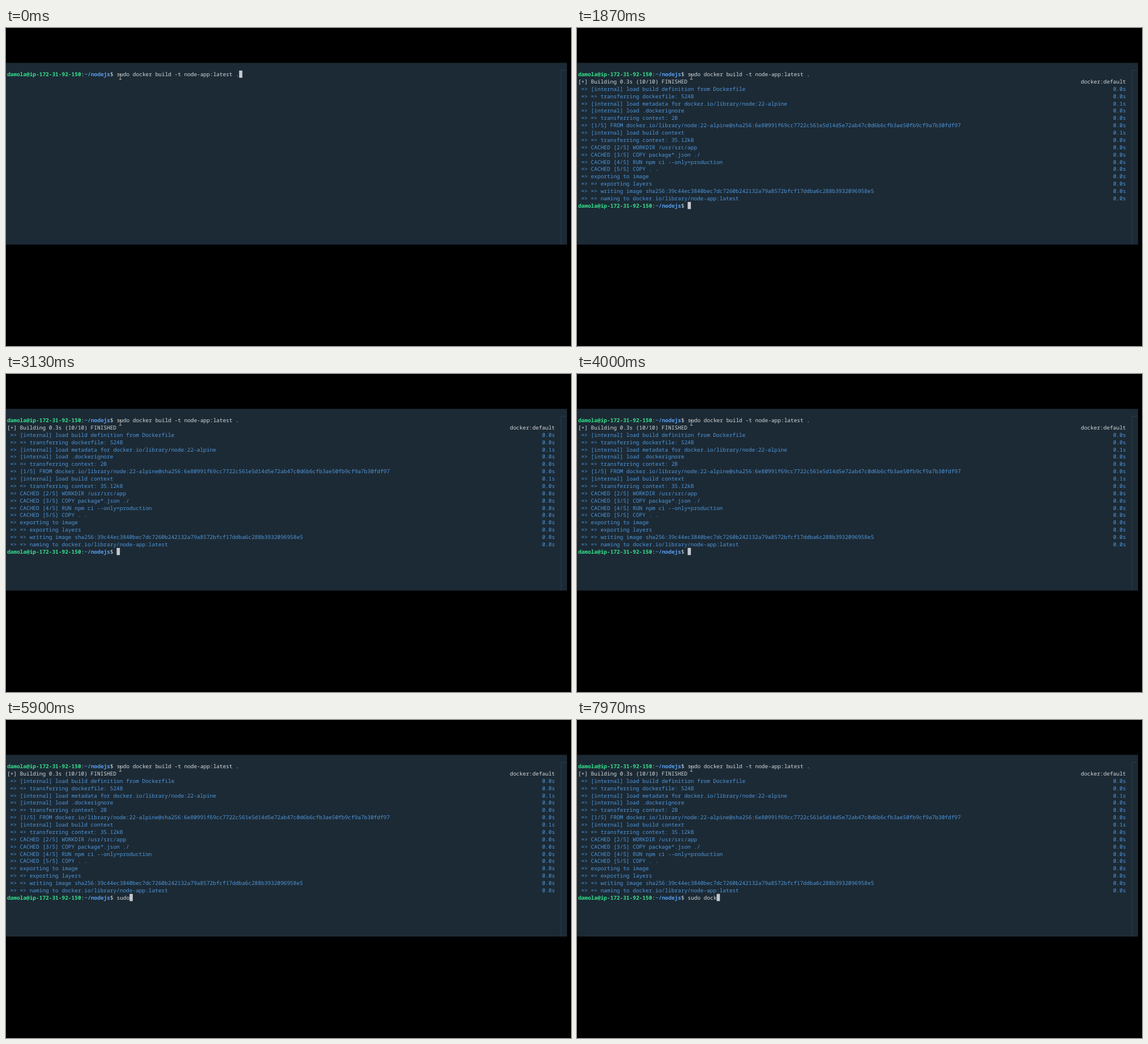
An HTML page that plays this animation: 998 px wide and 561 px high, repeating every 8 s.

```html
<!DOCTYPE html>
<html lang="en">
<head>
<meta charset="utf-8">
<title>Terminal build</title>
<style>
  html, body { margin: 0; width: 100%; height: 100%; overflow: hidden; background: #000; }
  svg { display: block; width: 100%; height: 100%; }
  text {
    font-family: "Noto Sans Mono", "DejaVu Sans Mono", monospace;
    font-size: 9.488px;
    white-space: pre;
    text-rendering: geometricPrecision;
  }
  .user { fill: #35e08c; font-weight: 700; }
  .path { fill: #5a9ff0; font-weight: 700; }
  .plain { fill: #d3d8dc; }
  .step { fill: #5096d9; }
</style>
</head>
<body>
<svg viewBox="0 0 998 561" preserveAspectRatio="xMinYMin meet">
  <rect width="998" height="561" fill="#000"/>
  <rect y="61.5" width="991" height="320.5" fill="#1c2a35"/>
  <path d="M991 74.5H980.5V382" fill="none" stroke="#2b3a47"/>
  <g id="screen"></g>
  <rect id="cursor" width="5.7" height="12.7" fill="#c4cacf"/>
  <path d="M199.8 81.5H204.2M202 81.5V90.5M199.8 90.5H204.2" fill="none" stroke="#c9b9a6" stroke-width="0.9"/>
</svg>
<script>
const LOOP = 8000;
const LEFT = 1.9, CELL = 5.693, TOP = 75.1, ROW = 12.87, BASE = 10;
const LAST_ROW = 18, PROMPT_LEN = 34, COLUMNS = 170;
const ENTER = 570, OUTPUT = 870, READY = 1130;

const command = "sudo docker build -t node-app:latest .";
const steps = [
  "[internal] load build definition from Dockerfile",
  "=> transferring dockerfile: 524B",
  "[internal] load metadata for docker.io/library/node:22-alpine",
  "[internal] load .dockerignore",
  "=> transferring context: 2B",
  "[1/5] FROM docker.io/library/node:22-alpine@sha256:6e80991f69cc7722c561e5d14d5e72ab47c0d6b6cfb3ae50fb9cf9a7b30fdf97",
  "[internal] load build context",
  "=> transferring context: 35.12kB",
  "CACHED [2/5] WORKDIR /usr/src/app",
  "CACHED [3/5] COPY package*.json ./",
  "CACHED [4/5] RUN npm ci --only=production",
  "CACHED [5/5] COPY . .",
  "exporting to image",
  "=> exporting layers",
  "=> writing image sha256:39c44ec3840bec7dc7260b242132a79a8572bfcf17ddba6c288b3932096958e5",
  "=> naming to docker.io/library/node-app:latest"
];
const slowSteps = [2, 6];

// Each entry is the time of a key press and the input line after it.
const typing = [
  [0, ""],
  [4370, "s"], [4470, "su"], [4570, "sud"], [4670, "sudo"], [4760, "sudoc"], [4850, "sudock"],
  [5450, "sudoc"], [5600, "sudo"],
  [6250, "sudo "],
  [7500, "sudo d"], [7620, "sudo do"], [7750, "sudo doc"], [7880, "sudo dock"]
];

const screen = document.getElementById("screen");
const cursor = document.getElementById("cursor");

function add(parent, tag, attrs) {
  const el = document.createElementNS("http://www.w3.org/2000/svg", tag);
  for (const key in attrs) el.setAttribute(key, attrs[key]);
  return parent.appendChild(el);
}

const colX = col => LEFT + col * CELL;
const rowY = row => TOP + row * ROW;

function write(parent, row, col, content, style) {
  const el = add(parent, "text", { x: colX(col), y: rowY(row) + BASE, class: style });
  el.textContent = content;
  return el;
}

function writePrompt(parent, row) {
  write(parent, row, 0, "damola@ip-172-31-92-150", "user");
  write(parent, row, 23, ":", "plain");
  write(parent, row, 24, "~/nodejs", "path");
  write(parent, row, 32, "$", "plain");
}

function writeRight(parent, row, content, style) {
  write(parent, row, COLUMNS - content.length, content, style);
}

writePrompt(screen, 0);
write(screen, 0, PROMPT_LEN, command, "plain");

const output = add(screen, "g");
write(output, 1, 0, "[+] Building 0.3s (10/10) FINISHED", "plain");
writeRight(output, 1, "docker:default", "plain");
steps.forEach((step, i) => {
  write(output, i + 2, 1, "=> " + step, "step");
  writeRight(output, i + 2, slowSteps.includes(i) ? "0.1s" : "0.0s", "step");
});

const nextLine = add(screen, "g");
writePrompt(nextLine, LAST_ROW);
const input = write(nextLine, LAST_ROW, PROMPT_LEN, "", "plain");

function show(el, visible) {
  el.setAttribute("visibility", visible ? "visible" : "hidden");
}

function cursorCell(t, typed) {
  if (t < ENTER) return [0, PROMPT_LEN + command.length];
  if (t < OUTPUT) return [1, 0];
  if (t < READY) return [LAST_ROW, 0];
  return [LAST_ROW, PROMPT_LEN + typed.length];
}

function render(t) {
  const typed = typing.filter(([at]) => at <= t).pop()[1];
  const [row, col] = cursorCell(t, typed);
  show(output, t >= OUTPUT);
  show(nextLine, t >= READY);
  input.textContent = typed;
  cursor.setAttribute("x", colX(col));
  cursor.setAttribute("y", rowY(row));
}

const start = performance.now();
function tick() {
  render((performance.now() - start) % LOOP);
  requestAnimationFrame(tick);
}
tick();
</script>
</body>
</html>
```
